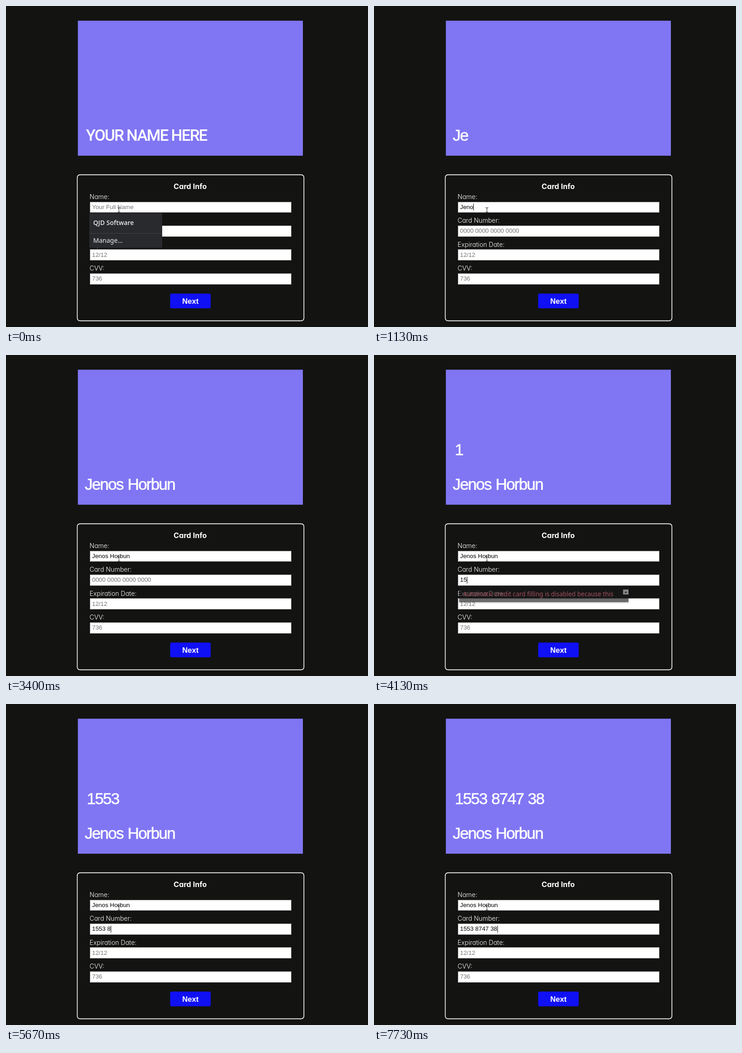
Recreate the animation shown at these times as an HTML page. Size 795x705 px, loop 8000 ms.

```html
<!DOCTYPE html>
<html lang="en">
<head>
<meta charset="utf-8">
<title>Card form</title>
<style>
  html, body { margin: 0; height: 100%; overflow: hidden; background: #131311; }
  svg { display: block; }
  text { white-space: pre; fill: #fff; }
  .face { font: 35px "Liberation Sans", Arial, sans-serif; letter-spacing: -1.8px; word-spacing: 1.6px; stroke: #fff; stroke-width: .6; }
  .face.hint { font: 500 35px Roboto, sans-serif; letter-spacing: -1.9px; word-spacing: 0; stroke: none; }
  .title { font: 700 16.2px Inter, sans-serif; text-anchor: middle; }
  .label { font: 300 14px Inter, sans-serif; }
  .title, .label { font-feature-settings: "cv11"; }
  .value { font: 13.333px "Liberation Sans", Arial, sans-serif; fill: #000; }
  .value.hint { fill: #757575; }
  .next { font: bold 16.7px "Liberation Sans", Arial, sans-serif; text-anchor: middle; }
  .menu { font: 14px "Noto Sans", sans-serif; fill: #e8eaed; }
  .menu.item { font: 600 14px "Open Sans", sans-serif; }
  .warning { font: 13.6px "Noto Sans", sans-serif; fill: #a3525d; }
</style>
</head>
<body>
<svg width="795" height="705" viewBox="0 0 795 705">
  <rect x="157.8" y="32.3" width="494.2" height="296.5" fill="#8076f3"/>
  <text id="faceNumber" class="face" x="177.5" y="219.5"></text>
  <text id="faceName" class="face" y="296"></text>

  <rect x="156.5" y="370.6" width="497.8" height="320.8" rx="6" fill="none" stroke="#fff" stroke-width="1.6"/>
  <text class="title" x="404.5" y="402">Card Info</text>
  <g id="fields"></g>
  <rect x="360.5" y="631.5" width="89" height="32.5" rx="3" fill="#1010f5"/>
  <text class="next" x="405" y="653.5">Next</text>

  <rect id="caret" width="1" height="15"/>
  <g id="suggestions">
    <rect x="183" y="455" width="160" height="76" fill="#292a2d"/>
    <path d="M183 499.5h160" stroke="#3f4246"/>
    <text class="menu item" x="191.5" y="481">QJD Software</text>
    <text class="menu" x="191.5" y="519.5">Manage…</text>
  </g>
  <g id="notice">
    <rect x="187" y="508" width="372" height="35" fill="#1f1e20" fill-opacity=".55" style="filter:drop-shadow(0 1px 2px #0006)"/>
    <text class="warning" x="196" y="530">Automatic credit card filling is disabled because this</text>
    <rect x="547" y="515" width="12" height="11" fill="#858585"/>
    <path d="M550 522.5l3-3.500 3 3.500z" fill="#222"/>
  </g>
  <path d="M245 442.5q3 0 3 2q0-2 3-2M248 444v8M245 453.5q3 0 3-2q0 2 3 2" fill="none" stroke="#222"/>
</svg>
<script>
const LOOP = 8000;
const ROW = 52.4;
const NAME = 'Jenos Horbun', NUMBER = '1553 8747 38';
const FIELDS = [
  ['Name:', 'Your Full Name'],
  ['Card Number:', '0000 0000 0000 0000'],
  ['Expiration Date:', '12/12'],
  ['CVV:', '736'],
];

// Times at which each successive character is typed
const nameKeys = [330, 670, 930, 1130, 1200, 1400, 1730, 2070, 2200, 2400, 2600, 2670];
const numberKeys = [3670, 4130, 4400, 4600, 5270, 5670, 5930, 6470, 6730, 7070, 7330, 7470];

// [time, characters shown]: the card trails the form and blinks empty now and then
const nameOnCard = [[530, 1], [870, 2], [1200, 5], [1870, 7], [2270, 9], [2470, 0], [2530, 10], [2730, 12]];
const numberOnCard = [[3930, 1], [4270, 2], [4530, 3], [4870, 4], [5730, 6], [6070, 7], [6600, 8],
  [6870, 9], [7130, 0], [7200, 9], [7530, 11], [7670, 0], [7730, 12]];

const $ = id => document.getElementById(id);
const typed = (text, keys, t) => text.slice(0, keys.filter(k => k <= t).length);
const shown = (steps, t) => steps.reduce((n, [at, count]) => at <= t ? count : n, 0);

$('fields').innerHTML = FIELDS.map(([label], i) => {
  const y = ROW * i;
  const top = Math.floor(430 + y), bottom = Math.round(454.4 + y);
  return `<text class="label" x="183.5" y="${424 + y}">${label}</text>
    <rect x="184.5" y="${top + .5}" width="442" height="${bottom - top - 1}" fill="#fff" stroke="#767676"/>
    <text class="value" x="189" y="${Math.round(446 + y)}"></text>`;
}).join('');
const inputs = document.querySelectorAll('.value');

function setText(el, text, hint) {
  const content = text || hint;
  if (el.textContent !== content) el.textContent = content;
  el.classList.toggle('hint', !text && hint !== '');
}

function draw(t) {
  const values = [typed(NAME, nameKeys, t), typed(NUMBER, numberKeys, t), '', ''];
  inputs.forEach((el, i) => setText(el, values[i], FIELDS[i][1]));

  const untouched = t < nameOnCard[0][0];
  setText($('faceName'), NAME.slice(0, shown(nameOnCard, t)), untouched ? 'YOUR NAME HERE' : '');
  $('faceName').setAttribute('x', untouched ? 175.5 : 173);
  setText($('faceNumber'), NUMBER.slice(0, shown(numberOnCard, t)), '');

  const active = t < 2800 ? 0 : 1;
  const width = values[active] ? inputs[active].getComputedTextLength() : 0;
  $('caret').setAttribute('x', Math.round(189 + width));
  $('caret').setAttribute('y', active ? 487 : 434);
  $('caret').style.opacity = t < 70 || (t >= 3400 && t < 3670) ? 0 : 1;

  $('suggestions').style.opacity = t < 330 ? 1 : t < 400 ? .5 : 0;
  $('notice').style.opacity = t < 3670 ? 0 : t < 4200 ? 1 : t < 4330 ? .5 : 0;
}

const start = performance.now();
(function frame() {
  draw((performance.now() - start) % LOOP);
  requestAnimationFrame(frame);
})();
</script>
</body>
</html>
```
